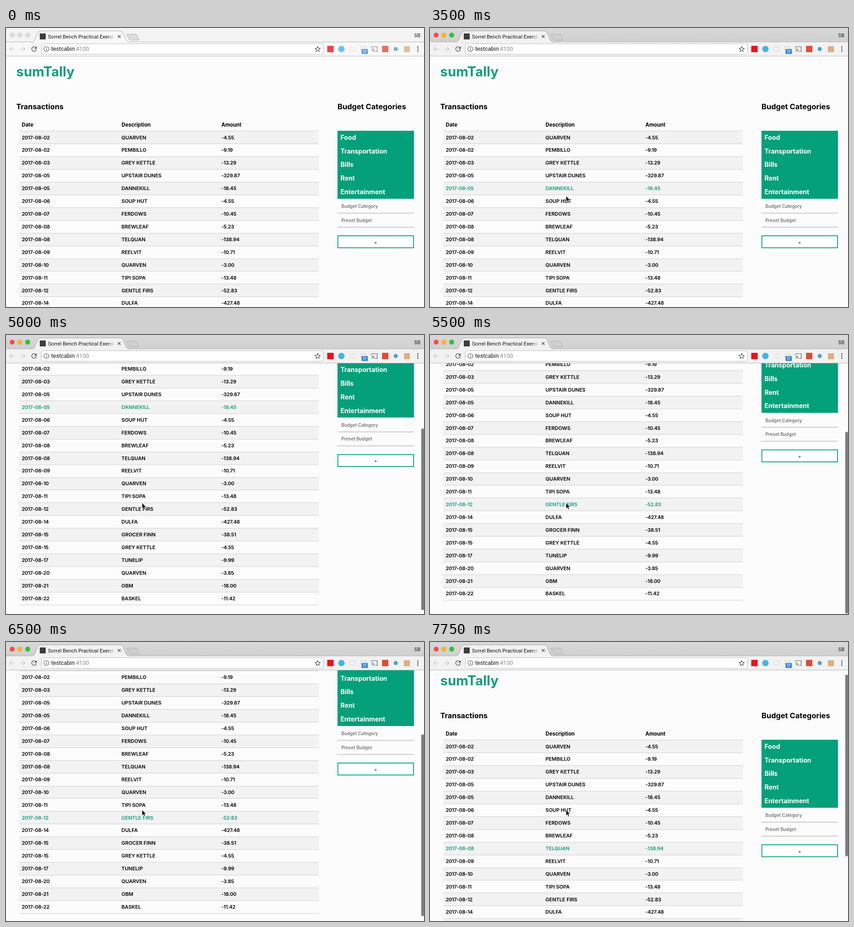
Recreate the animation shown at these times as an HTML page. Size 916 px wide and 611 px high, loop 8 s.

```html
<!DOCTYPE html>
<html lang="en">
<head>
<meta charset="utf-8">
<title>Budget page</title>
<style>
html, body { margin: 0; width: 100%; height: 100%; overflow: hidden; background: #fcfcfc; }
svg { display: block; font-family: Inter, "Open Sans", sans-serif; }
#page { font-weight: 700; }
.row { font-size: 11px; font-weight: 600; }
.num { letter-spacing: -.25px; }
.hover { fill: #149c78; }
.ui { font-family: Roboto, Arial, sans-serif; }
.line { fill: none; stroke: #5a5a5a; stroke-width: 1.5; }
</style>
</head>
<body>
<svg width="916" height="611" viewBox="0 0 916 611">
  <defs>
    <linearGradient id="strip" x2="0" y2="1">
      <stop stop-color="#d8d8d8"/><stop offset="1" stop-color="#d0d0d0"/>
    </linearGradient>
    <linearGradient id="fade" gradientUnits="userSpaceOnUse" x1="222" x2="240">
      <stop stop-color="#111"/><stop offset="1" stop-color="#111" stop-opacity="0"/>
    </linearGradient>
  </defs>

  <g id="page"></g>
  <rect id="thumb" x="910" width="6" height="398" rx="3" fill="#7d7d7d"/>

  <g id="chrome">
    <rect id="bar" width="916" height="31"/>
    <path d="M0 30.5H916" stroke="#b4b4b4"/>
    <rect id="tools" y="31" width="916" height="31"/>
    <path d="M0 61.5H916" stroke="#b8b8b8"/>
    <path id="tab" d="M57 31Q61 30 63 26L70 10Q71.500 6.500 75 6.500H251Q254.500 6.500 256 10L263 26Q265 30 269 31" stroke="#aaa"/>
    <path id="plus" d="M266 13.500H284Q286 13.500 287 15.500L291 24Q292 26.500 289.500 26.500H273Q271 26.500 270 24.500L265 15.500Q264 13.500 266 13.500Z" stroke="#b0b0b0"/>
    <g id="lights"></g>
    <rect id="favicon" x="74" y="12" width="13" height="13" fill="#3c3c3c"/>
    <path id="spinner" d="M80 12.500A6 6 0 0 1 86 18.500" fill="none" stroke="#8c9bb5" stroke-width="1.500"/>
    <text class="ui" x="92" y="22.500" font-size="11.300" fill="url(#fade)">Sorrel Bench Practical Exerci</text>
    <path class="line" d="M245 15.500l6 6m0-6l-6 6"/>
    <text x="908" y="20" font-size="10.500" text-anchor="end" fill="#111">SB</text>

    <rect id="press" x="51" y="36" width="21" height="21" rx="2" fill="#d8d8d8"/>
    <path class="line" style="stroke:#cfcfcf" d="M19 46H8m5-5l-5 5l5 5M31 46H42m-5-5l5 5l-5 5"/>
    <g id="reload">
      <path class="line" d="M65 42.500A5 5 0 1 0 66.300 47"/>
      <path d="M67.500 40V45.500H62Z" fill="#5a5a5a"/>
    </g>
    <path id="stop" class="line" d="M56.500 41.500l9 9m0-9l-9 9"/>
    <rect x="77.500" y="34.500" width="618" height="23" rx="3" fill="#fff" stroke="#bcbcbc"/>
    <circle class="line" style="stroke-width:1.200" cx="88.500" cy="46" r="5.500"/>
    <path class="line" d="M88.500 42.500v1.500m0 1.300v4"/>
    <text class="ui" x="99" y="50.300" font-size="12.500" fill="#111">testcabin<tspan fill="#888">:4100</tspan></text>
    <path class="line" style="stroke-width:1.200" d="M683 40.500l1.600 3.700 4 .4-3 2.700 .9 4-3.500-2.100-3.500 2.100 .9-4-3-2.700 4-.4Z"/>

    <g id="icons">
      <rect x="704" y="39" width="14" height="14" rx="1" fill="#f0101c"/>
      <circle cx="735" cy="46" r="7" fill="#45b5e0"/>
      <rect x="753.500" y="41.500" width="11" height="9" rx="1" fill="none" stroke="#d8d8d8"/>
      <rect x="777.500" y="40.500" width="12" height="10" rx="1" fill="#eee" stroke="#d0d0d0"/>
      <rect x="779" y="46" width="14" height="11" rx="1" fill="#3f87d9"/>
      <text x="786" y="54.800" font-size="8.500" text-anchor="middle" fill="#fff">17</text>
      <path class="line" style="stroke-width:1.200" d="M801 43.500V41H813.500V51.500H809M801 45.500A6 6 0 0 1 807 51.500M801 48.500A3 3 0 0 1 804 51.500"/>
      <rect id="badge" x="824" y="39" width="14" height="14" rx="1"/>
      <circle cx="854" cy="46" r="4.500" fill="#4aa3d0"/>
      <rect x="872" y="40" width="13" height="13" fill="#dcae80"/>
    </g>
    <g fill="#5a5a5a">
      <circle cx="902.500" cy="41.500" r="1.500"/><circle cx="902.500" cy="46" r="1.500"/><circle cx="902.500" cy="50.500" r="1.500"/>
    </g>
  </g>
  <path id="cursor" d="M0 0V13L3 10.300 5 15 7.300 14 5.300 9.500H9.500Z" fill="#111" stroke="#fff" stroke-width=".9"/>
</svg>

<script>
const $ = id => document.getElementById(id);
const GREEN = '#03a07a', LOOP = 8000, TICK = 250, PITCH = 27.92, TOP = 225.3;

const rows = `02 QUARVEN -4.55|02 PEMBILLO -9.19|03 GREY KETTLE -13.29|05 UPSTAIR DUNES -329.87
05 DANNEKILL -18.45|06 SOUP HUT -4.55|07 FERDOWS -10.45|08 BREWLEAF -5.23|08 TELQUAN -138.94
09 REELVIT -10.71|10 QUARVEN -3.00|11 TIPI SOPA -13.48|12 GENTLE FIRS -52.83|14 DULFA -427.48
15 GROCER FINN -38.51|15 GREY KETTLE -4.55|17 TUNELIP -9.99|20 QUARVEN -3.85|21 OBM -18.00
22 BASKEL -11.42`.split(/[|\n]/).map(s => s.match(/^(\d+) (.+) (-.+)$/).slice(1));

const text = (x, y, size, s, extra = '') => `<text x="${x}" y="${y}" font-size="${size}" ${extra}>${s}</text>`;
const rect = (x, y, w, h, fill, extra = '') => `<rect x="${x}" y="${y}" width="${w}" height="${h}" fill="${fill}" ${extra}/>`;
const rule = i => rect(29, Math.round(TOP + i * PITCH), 656.5, 1, '#cfcfcf');

function tableRow([day, name, sum], i) {
  const y = Math.round(TOP + i * PITCH), base = TOP + i * PITCH + 18.2;
  return (i % 2 ? '' : rect(29, y, 656.5, 28, '#f2f2f2')) + rule(i) +
    `<g class="row"><text class="num" x="34.500" y="${base}">2017-08-${day}</text>
     <text x="253" y="${base}">${name}</text><text class="num" x="472" y="${base}">${sum}</text></g>`;
}

$('page').innerHTML =
  text(22.5, 105.5, 29.3, 'sumTally', 'fill="#149c78"') +
  text(22.5, 178, 16.3, 'Transactions') +
  text(726.5, 178, 16.5, 'Budget Categories') +
  ['Date', 'Description', 'Amount'].map((s, i) => text(34.5 + i * 218.75, 215.7, 11.3, s)).join('') +
  rows.map(tableRow).join('') + rule(rows.length) +
  rect(726.4, 225, 167.6, 149, GREEN) +
  ['Food', 'Transportation', 'Bills', 'Rent', 'Entertainment']
    .map((s, i) => text(733, 244.7 + i * 29.8, 14.1, s, 'fill="#fff"')).join('') +
  ['Budget Category', 'Preset Budget'].map((s, i) =>
    text(735, 394 + i * 30.7, 9.8, s, 'fill="#777" font-weight="600"') +
    rect(726.4, 404.5 + i * 30.7, 167.6, 2, '#cccccc')).join('') +
  rect(727.3, 455.1, 165.8, 26.2, '#fff', `stroke="${GREEN}" stroke-width="1.8"`) +
  text(810, 472.5, 10, '+', 'text-anchor="middle" font-weight="500" fill="#333"');

const rowNodes = [...document.querySelectorAll('.row')];

// Linear track through [time, ...values] keys
function track(keys, t) {
  const n = keys.findIndex(k => k[0] > t);
  if (n < 0) return keys[keys.length - 1].slice(1);
  if (!n) return keys[0].slice(1);
  const a = keys[n - 1], b = keys[n], p = (t - a[0]) / (b[0] - a[0]);
  return a.slice(1).map((v, i) => v + (b[i + 1] - v) * p);
}

const pointer = [[250, 480, 129], [500, 203, 64], [750, 102, 56], [1000, 62, 51], [1250, 55, 50],
  [2500, 55, 50], [2750, 82, 84], [3000, 190, 205], [3250, 286, 352], [3500, 298, 367.5]];
const scroll = [[4000, 0], [4250, 14], [4500, 70], [4750, 148], [5000, 193.3], [5250, 201],
  [5500, 203.5], [6250, 203.5], [6500, 190], [6750, 152], [7000, 104], [7250, 89.5], [7500, 44], [7750, 11]];
const hovers = [[3250, 4], [5500, 12], [7000, 8]];

const show = (id, on) => $(id).setAttribute('visibility', on ? 'visible' : 'hidden');
const fill = (id, c) => $(id).setAttribute('fill', c);

function draw(t) {
  const active = t >= 1500, loading = t >= 1750 && t < 2500;
  const [x, y] = track(pointer, t), [top] = track(scroll, t);

  $('page').setAttribute('transform', `translate(0 ${-top})`);
  $('thumb').setAttribute('y', 63.5 + top * .73);
  show('thumb', t >= 4250);

  const hover = hovers.filter(h => h[0] <= t).pop();
  rowNodes.forEach((r, i) => r.classList.toggle('hover', !!hover && hover[1] === i));

  fill('bar', active ? 'url(#strip)' : '#f4f4f4');
  fill('tools', active ? '#f2f2f2' : '#f8f8f8');
  fill('tab', active ? '#f2f2f2' : '#f8f8f8');
  fill('plus', active ? '#cfcfcf' : '#dedede');
  const colors = active ? ['#fc4b48', '#fdb428', '#2ac33c'] : ['#dcdcdc', '#dcdcdc', '#dcdcdc'];
  $('lights').innerHTML = colors.map((c, i) =>
    `<circle cx="${13.5 + i * 17}" cy="15.500" r="5.300" fill="${c}" stroke="#0002" stroke-width=".6"/>`).join('');
  $('icons').setAttribute('opacity', active ? 1 : .78);
  fill('badge', active && t < 2750 ? '#d63a24' : '#dc4f38');

  show('favicon', !loading);
  show('spinner', loading);
  $('spinner').setAttribute('transform', `rotate(${(t - 1750) * .36} 80 18.5)`);
  show('reload', !loading);
  show('stop', loading);
  show('press', t >= 1000 && t < 2750);

  $('cursor').setAttribute('transform', `translate(${x} ${y})`);
  show('cursor', t >= 250);
}

let last = -1;
function frame() {
  const t = Math.floor(performance.now() % LOOP / TICK) * TICK;
  if (t !== last) draw(last = t);
  requestAnimationFrame(frame);
}
frame();
</script>
</body>
</html>
```
